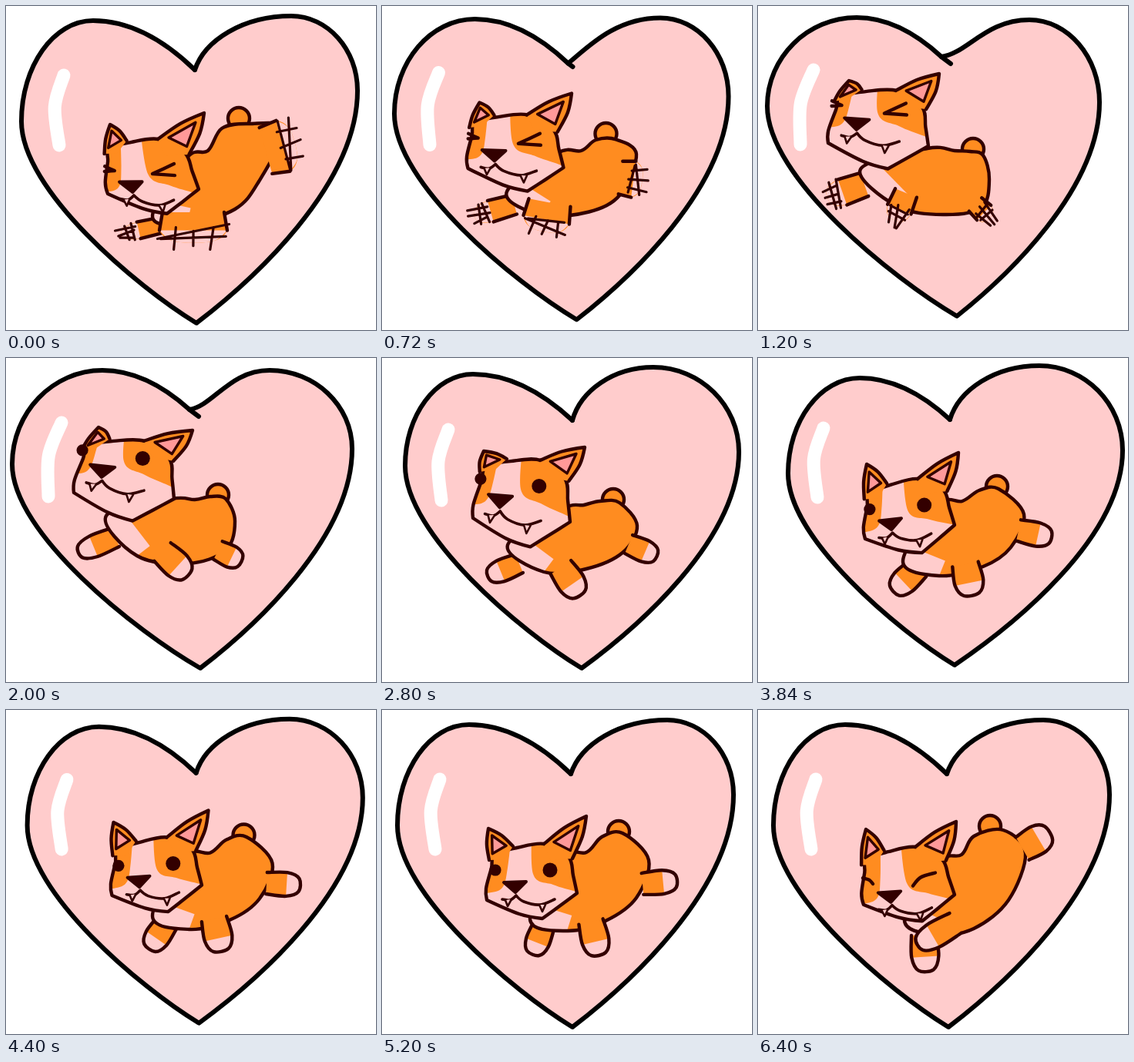
Animation, 480 px wide and 421 px high, one loop 6720 ms. Source, as an HTML page:

```html
<!DOCTYPE html>
<html lang="en">
<head>
<meta charset="utf-8">
<title>Running puppy in a heart</title>
<style>
html, body { margin: 0; width: 100%; height: 100%; overflow: hidden; background: #fff; }
svg { display: block; width: 100%; height: 100%; }
path { stroke-linecap: round; stroke-linejoin: round; }
</style>
</head>
<body>
<svg id="stage" viewBox="0 0 480 421"></svg>
<script>
const LOOP = 6720;
const PINK = '#ffcccc', ORANGE = '#ff8c20', DARK = '#330000', EAR = '#ff9999';

// heart: notch, right top, right side, tip, left side, left top
// head: left jaw, right cheek, crown; ears: two tips; look: shift of the face
// legs: hip, toe, half width
const rest = {
  heart: [245, 83, 370, 13, 456, 110, 247, 412, 20, 150, 113, 19],
  shine: [75, 90, 69, 181], fold: [0]
};
const poses = [
  { ...rest, eyes: 'squint', blur: true,
    body: [235, 197, 262, 188, 280, 159, 315, 153, 360, 160, 328, 228, 297, 264, 235, 283, 190, 273],
    tail: [302, 146], head: [132, 244, 250, 238, 198, 173], ears: [135, 154, 257, 139], look: [-4, 7],
    far: [205, 284, 152, 296, 10], near: [243, 268, 243, 306, 40], hind: [337, 188, 373, 178, 31] },
  { heart: [238, 66, 352, 18, 443, 125, 258, 403, 12, 130, 128, 15],
    shine: [72, 83, 55, 180], fold: [1], eyes: 'squint', blur: true,
    body: [220, 185, 255, 188, 275, 189, 292, 194, 300, 225, 290, 262, 240, 271, 180, 260, 133, 212],
    tail: [279, 186], head: [91, 178, 221, 182, 180, 110], ears: [118, 97, 235, 88], look: [-5, -11],
    far: [138, 232, 92, 248, 16], near: [192, 243, 178, 277, 15], hind: [282, 258, 300, 275, 12] },
  { heart: [238, 67, 342, 16, 449, 118, 252, 403, 8, 138, 125, 16],
    shine: [72, 84, 55, 180], fold: [1], eyes: 'open',
    body: [215, 183, 245, 184, 265, 180, 285, 183, 297, 212, 285, 250, 236, 267, 170, 257, 130, 205],
    tail: [275, 178], head: [88, 175, 218, 183, 180, 108], ears: [120, 90, 242, 94], look: [-6, -15],
    far: [142, 233, 96, 252, 13], near: [203, 252, 235, 281, 16], hind: [275, 250, 304, 264, 13] },
  { heart: [247, 81, 352, 12, 463, 122, 259, 403, 30, 140, 118, 21],
    shine: [86, 93, 77, 185], fold: [0], eyes: 'open',
    body: [235, 196, 262, 191, 283, 186, 308, 188, 331, 218, 312, 253, 265, 274, 210, 278, 163, 243],
    tail: [300, 184], head: [118, 208, 244, 213, 206, 133], ears: [132, 121, 263, 116], look: [-6, -7],
    far: [178, 267, 139, 283, 13], near: [232, 272, 256, 307, 16], hind: [320, 242, 355, 257, 13] },
  { heart: [249, 80, 365, 10, 473, 120, 255, 399, 39, 150, 132, 26],
    shine: [85, 91, 77, 181], fold: [0], eyes: 'open',
    body: [235, 190, 265, 186, 287, 172, 312, 170, 345, 203, 328, 246, 292, 271, 235, 283, 188, 264],
    tail: [310, 167], head: [139, 235, 255, 217, 208, 157], ears: [141, 138, 260, 123], look: [-2, 1],
    far: [208, 273, 177, 302, 15], near: [269, 268, 277, 307, 17], hind: [338, 224, 379, 233, 14] },
  { ...rest, eyes: 'open',
    body: [230, 190, 265, 185, 285, 165, 312, 160, 346, 195, 330, 244, 290, 274, 240, 287, 192, 272],
    tail: [307, 158], head: [136, 247, 253, 238, 211, 174], ears: [138, 154, 265, 138], look: [0, 0],
    far: [210, 280, 196, 316, 14], near: [271, 275, 281, 317, 16], hind: [338, 226, 381, 222, 14] },
  { ...rest, eyes: 'smile',
    body: [235, 197, 264, 188, 280, 164, 318, 156, 347, 186, 325, 247, 280, 284, 230, 292, 190, 272],
    tail: [301, 151], head: [137, 253, 255, 240, 205, 178], ears: [140, 155, 257, 145], look: [-1, 8],
    far: [215, 292, 218, 338, 16], near: [256, 277, 209, 304, 15], hind: [343, 180, 377, 160, 17] }
];

// Each run: start pose, end pose, times of its drawings, steps for the heart.
const runs = [
  [0, 1, [320, 480, 640, 800, 960, 1200]],
  [1, 2, [1520, 1760, 2000]],
  [2, 3, [2240, 2400, 2560, 2800]],
  [3, 4, [3040, 3200, 3360, 3520, 3680, 3840]],
  [4, 5, [4000, 4160, 4320, 4560, 4800, 5200], 5],
  [5, 6, [6160, 6400]]
];
const cels = [{ time: 0, from: 0, to: 0, mix: 0, heartMix: 0 }];
for (const [from, to, times, heartSteps = times.length] of runs) {
  times.forEach((time, i) => cels.push({
    time, from, to, mix: (i + 1) / times.length, heartMix: Math.min(1, (i + 1) / heartSteps)
  }));
}

const lerp = (a, b, t) => a.map((v, i) => v + (b[i] - v) * t);
const add = (p, d, k = 1) => [p[0] + d[0] * k, p[1] + d[1] * k];
const sub = (p, q) => [p[0] - q[0], p[1] - q[1]];
const at = p => p[0].toFixed(1) + ' ' + p[1].toFixed(1);

// Pairs up a flat list; the points in `corners` stay sharp.
function points(flat, corners = []) {
  const list = [];
  for (let i = 0; i < flat.length; i += 2) {
    list.push([flat[i], flat[i + 1], corners.includes(i / 2) ? 1 : 0]);
  }
  return list;
}

// Smooth spline through points.
function curve(pts, closed) {
  const n = pts.length;
  const get = i => closed ? pts[(i + n) % n] : pts[Math.max(0, Math.min(n - 1, i))];
  const handle = (p, a, b) => at(p[2] ? p : add(p, sub(b, a), 1 / 6));
  let d = 'M' + at(pts[0]);
  for (let i = 0; i < (closed ? n : n - 1); i++) {
    const p = get(i), q = get(i + 1);
    d += `C${handle(p, get(i - 1), q)} ${handle(q, get(i + 2), p)} ${at(q)}`;
  }
  return d + (closed ? 'Z' : '');
}

const line = pts => 'M' + pts.map(at).join('L');
const disc = ([x, y], r) => `M${at([x - r, y])}a${r} ${r} 0 1 0 ${2 * r} 0a${r} ${r} 0 1 0 ${-2 * r} 0Z`;
const shape = (d, fill, width = 0, color = DARK, extra = '') =>
  `<path d="${d}" fill="${fill}" stroke="${width ? color : 'none'}" stroke-width="${width}" ${extra}/>`;
const ink = (d, width = 4.4, color = DARK, extra) => shape(d, 'none', width, color, extra);
const clip = (id, d) => `<clipPath id="${id}"><path d="${d}"/></clipPath>`;
const clipped = id => `clip-path="url(#${id})"`;

// Face drawn once; three anchors of the head carry it into every pose.
const anchors = points([136, 247, 253, 238, 211, 174]);
const face = {
  outline: points([146, 188, 175, 179, 211, 174, 242, 191, 248, 215, 253, 238, 230, 255, 208, 271, 178, 265, 136, 247, 135, 232, 142, 205], [5, 7, 9]),
  patchL: points([115, 160, 169, 150, 163, 205, 156, 231, 136, 238, 105, 240], [0, 1, 5]),
  patchR: points([195, 145, 275, 145, 275, 243, 252, 236, 222, 227, 196, 213], [0, 1, 2]),
  nose: points([158, 224, 187, 223, 173, 237]),
  mouth: points([156, 246, 166, 247, 174, 241, 184, 249, 205, 253, 224, 246], [2]),
  fangs: [points([160, 247, 163, 255, 168, 246]), points([204, 253, 208, 262, 212, 253])],
  eyeL: [147, 208], eyeR: [218, 208],
  earL: points([139, 195, 170, 177]), earR: points([210, 174, 247, 193])
};
const lids = {
  squint: points([12, -9, -16, 4, 13, 6], [1]),
  smile: points([-14, 9, -4, -2, 15, -8])
};

function carrier([o, r, t]) {
  const [bo, br, bt] = anchors;
  const u = sub(br, bo), v = sub(bt, bo), det = u[0] * v[1] - u[1] * v[0];
  return p => {
    const d = sub(p, bo);
    const a = (d[0] * v[1] - d[1] * v[0]) / det, b = (u[0] * d[1] - u[1] * d[0]) / det;
    return [...add(add(o, sub(r, o), a), sub(t, o), b), p[2]];
  };
}

function drawHeart(keys, shine, fold) {
  const [notch, topR, sideR, tip, sideL, topL] = points(keys);
  // A point part of the way from p to q, separately along x and y.
  const part = (p, q, x, y) => at([p[0] + (q[0] - p[0]) * x, p[1] + (q[1] - p[1]) * y]);
  const k = 0.55;
  const d = `M${at(notch)}
    C${part(notch, topR, 0.1 + 0.2 * fold, 0.55 - 0.45 * fold)} ${part(topR, notch, 0.5, 0)} ${at(topR)}
    C${part(topR, sideR, k, 0)} ${part(sideR, topR, 0, k)} ${at(sideR)}
    C${part(sideR, tip, 0, 0.41)} ${part(tip, sideR, 0.34, 0.18)} ${at(tip)}
    C${part(tip, sideL, 0.34, 0.18)} ${part(sideL, tip, 0, 0.34)} ${at(sideL)}
    C${part(sideL, topL, 0, k)} ${part(topL, sideL, k, 0)} ${at(topL)}
    C${part(topL, notch, 0.4, 0)} ${part(notch, topL, 0.25, 0.5)} ${at(notch)}Z`;
  const [a, b] = points(shine);
  const bend = add(lerp(a, b, 0.45), [-9, 0]);
  return shape(d, PINK, 6, '#000')
    + ink(line([notch, add(notch, [12, 9], fold)]), 6, '#000')
    + ink(curve([a, bend, b]), 17, '#fff');
}

function drawLeg([hx, hy, tx, ty, w], blur, random) {
  const hip = [hx, hy], toe = [tx, ty], length = Math.hypot(tx - hx, ty - hy);
  const dir = sub(toe, hip).map(v => v / length), side = [-dir[1], dir[0]];
  const ankle = lerp(hip, toe, 0.62);
  const pts = [[hip, -w], [ankle, -1.1 * w], [toe, -0.6 * w], [toe, 0.6 * w], [ankle, 1.1 * w], [hip, w]]
    .map(([p, k]) => add(p, side, k));
  const fill = shape(curve(pts), ORANGE) + shape(curve(pts.slice(1, 5)), PINK);
  if (!blur) return fill + ink(curve(pts));

  // Fast legs: two open sides and a hatch of speed lines.
  const sides = line(pts.slice(0, 2)) + line(pts.slice(4));
  const hatch = (centre, along, half) => {
    const tilt = add(along, along === dir ? side : dir, random() * 0.5 - 0.25);
    return line([add(centre, tilt, -half), add(centre, tilt, half)]);
  };
  let dashes = '';
  for (let i = -1; i <= 1; i++) dashes += hatch(add(add(toe, side, i * w * 0.6), dir, -4), dir, 9 + 6 * random());
  for (let i = 0; i < 2; i++) dashes += hatch(add(toe, dir, -5 - 8 * i), side, w * (0.8 + 0.4 * random()));
  return fill + ink(sides) + ink(dashes, 3.2);
}

function drawEar([a, b], tip) {
  const sharp = [...tip.slice(0, 2), 1], centre = lerp(lerp(a, b, 0.5), tip, 1 / 3);
  const bulge = p => { const m = lerp(p.slice(0, 2), tip, 0.5); return add(m, sub(m, centre), 0.25); };
  const edge = curve([a, bulge(a), sharp, bulge(b), b]);
  const root = add(lerp(a, b, 0.5), sub(centre, tip), 0.4);
  const inner = [a, tip, b].map(p => lerp(p.slice(0, 2), centre, 0.42));
  return shape(edge + 'L' + at(root) + 'Z', ORANGE) + ink(edge) + shape(line(inner) + 'Z', EAR, 3.4);
}

function drawEye(centre, kind, scale, mirror) {
  if (kind === 'open') return shape(disc(centre, 9.5 * scale), DARK);
  const k = mirror ? -0.45 : 1;
  return ink(curve(lids[kind].map(([x, y, c]) => [centre[0] + x * k, centre[1] + y * Math.abs(k), c])));
}

function drawHead(pose, kind) {
  const carry = carrier(points(pose.head));
  const look = p => { const q = carry(p); return [...add(q, pose.look), q[2]]; };
  const outline = curve(face.outline.map(carry), true);
  const [tipL, tipR] = points(pose.ears);
  const patch = pts => shape(curve(pts.map(look), true), ORANGE, 0, '', clipped('headClip'));
  return clip('headClip', outline) + shape(outline, PINK)
    + patch(face.patchL) + patch(face.patchR) + ink(outline)
    + drawEar(face.earL.map(carry), tipL) + drawEar(face.earR.map(carry), tipR)
    + drawEye(look(face.eyeL), kind, 0.8, true) + drawEye(look(face.eyeR), kind, 1, false)
    + shape(line(face.nose.map(look)) + 'Z', DARK, 4)
    + ink(curve(face.mouth.map(look)), 3.6)
    + face.fangs.map(f => shape(line(f.map(look)), PINK, 2.6)).join('');
}

function seeded(seed) {
  return () => (seed = (seed * 16807) % 2147483647) / 2147483647;
}

const stage = document.getElementById('stage');

function draw({ time, from, to, mix, heartMix }) {
  const a = poses[from], b = poses[to], pose = {};
  for (const key in a) {
    if (Array.isArray(a[key])) {
      pose[key] = lerp(a[key], b[key], ['heart', 'shine', 'fold'].includes(key) ? heartMix : mix);
    }
  }
  const { eyes, blur } = mix < 0.6 ? a : b;
  const random = seeded(time + 7);
  const body = points(pose.body), trunk = curve(body, true);
  stage.innerHTML = drawHeart(pose.heart, pose.shine, pose.fold[0])
    + shape(disc(pose.tail, 14), ORANGE, 4.4)
    + drawLeg(pose.far, blur, random)
    + clip('bodyClip', trunk) + shape(trunk, ORANGE)
    + ink(line(body.slice(-2)), 42, PINK, clipped('bodyClip') + ' style="stroke-linecap:butt"')
    + ink(trunk)
    + drawLeg(pose.hind, blur, random) + drawLeg(pose.near, blur, random)
    + drawHead(pose, eyes);
}

let shown = null;
const start = performance.now();
function tick() {
  const time = (performance.now() - start) % LOOP;
  const cel = cels.findLast(c => c.time <= time);
  if (cel !== shown) draw(shown = cel);
  requestAnimationFrame(tick);
}
tick();
</script>
</body>
</html>
```
